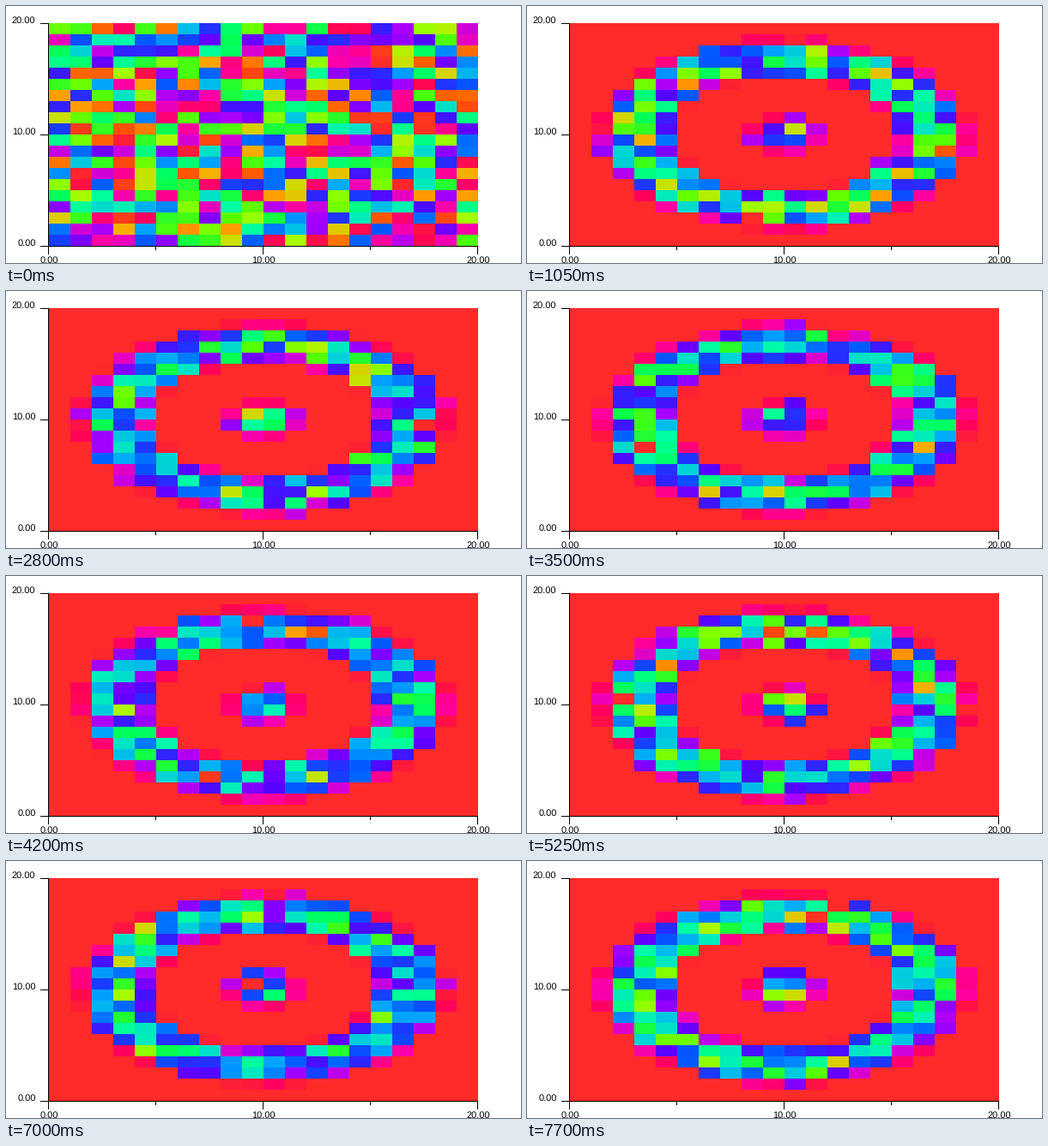
Recreate the animation shown at these times as a matplotlib script. Size 600x300 px, loop 8000 ms.

```python
import numpy as np
import matplotlib.pyplot as plt
from matplotlib.animation import FuncAnimation

W, H, DPI = 600, 300, 100
LEFT, RIGHT, TOP, BOTTOM = 50, 550, 20, 280
N = 20
LOOP, TICK, HOLD = 8000, 50, 350

plt.rcParams["font.family"] = "Liberation Sans"
plt.rcParams["text.hinting"] = "none"
plt.rcParams["text.hinting_factor"] = 1

# Mean density by distance from the centre: a small core and a broad ring.
RADII = [0, 0.7, 1.6, 2.1, 5.1, 5.5, 6.2, 7.5, 8.3, 8.5, 8.75]
MEANS = [0.55, 0.5, 0.11, 0, 0, 0.28, 0.5, 0.48, 0.22, 0.09, 0]
offset = np.arange(N) - (N - 1) / 2
DENSITY = np.interp(np.hypot(offset[:, None], offset), RADII, MEANS)


def field(step):
    """Values in 0..1: plain noise first, then noisy counts around DENSITY."""
    rng = np.random.default_rng(40 + step)
    if step == 0:
        return rng.random((N, N))
    counts = rng.gamma(22 * DENSITY)
    return counts / counts.max()


def spectrum(v):
    """Cosine hue wheel running from red through magenta and blue back to red."""
    shift = 2 * np.pi * np.array([0, 1, 2]) / 3
    return np.clip(0.5 + np.cos(-2 * np.pi * v[..., None] - shift) * 2 / 3, 0, 1)


fields = [spectrum(field(k)) for k in range(-(-LOOP // HOLD))]

fig = plt.figure(figsize=(W / DPI, H / DPI), dpi=DPI, facecolor="white")
ax = fig.add_axes([0, 0, 1, 1])
image = ax.imshow(fields[0], extent=(LEFT, RIGHT, BOTTOM, TOP),
                  interpolation="nearest", aspect="auto")
ax.set(xlim=(0, W), ylim=(H, 0))
ax.axis("off")


def line(x0, y0, x1, y1):
    ax.plot([x0, x1], [y0, y1], color="black", lw=72 / DPI,
            solid_capstyle="butt", snap=False, zorder=3)


def label(x, y, value, ha):
    ax.text(x, y, f"{value:.2f}", ha=ha, va="baseline",
            fontsize=11 * 72 / DPI, color="black")


axis_x, axis_y = LEFT - 0.5, BOTTOM + 0.5
line(axis_x, TOP, axis_x, BOTTOM + 1)
line(LEFT - 1, axis_y, RIGHT, axis_y)

for i, value in enumerate((0, 10, 20)):
    x = axis_x + i * (RIGHT - LEFT) / 2
    y = axis_y - i * (BOTTOM - TOP) / 2
    line(x, BOTTOM, x, BOTTOM + 10)
    line(LEFT - 10, y, LEFT, y)
    label(x + 0.5, 300, value, "center")
    label(34.5, y - 0.5, value, "right")
for i in (1, 3):
    x = axis_x + i * (RIGHT - LEFT) / 4
    line(x, BOTTOM, x, BOTTOM + 5)


def update(frame):
    image.set_data(fields[frame * TICK // HOLD])
    return [image]


anim = FuncAnimation(fig, update, frames=LOOP // TICK, interval=TICK,
                     repeat=True, repeat_delay=0, blit=False)
plt.show()
```
